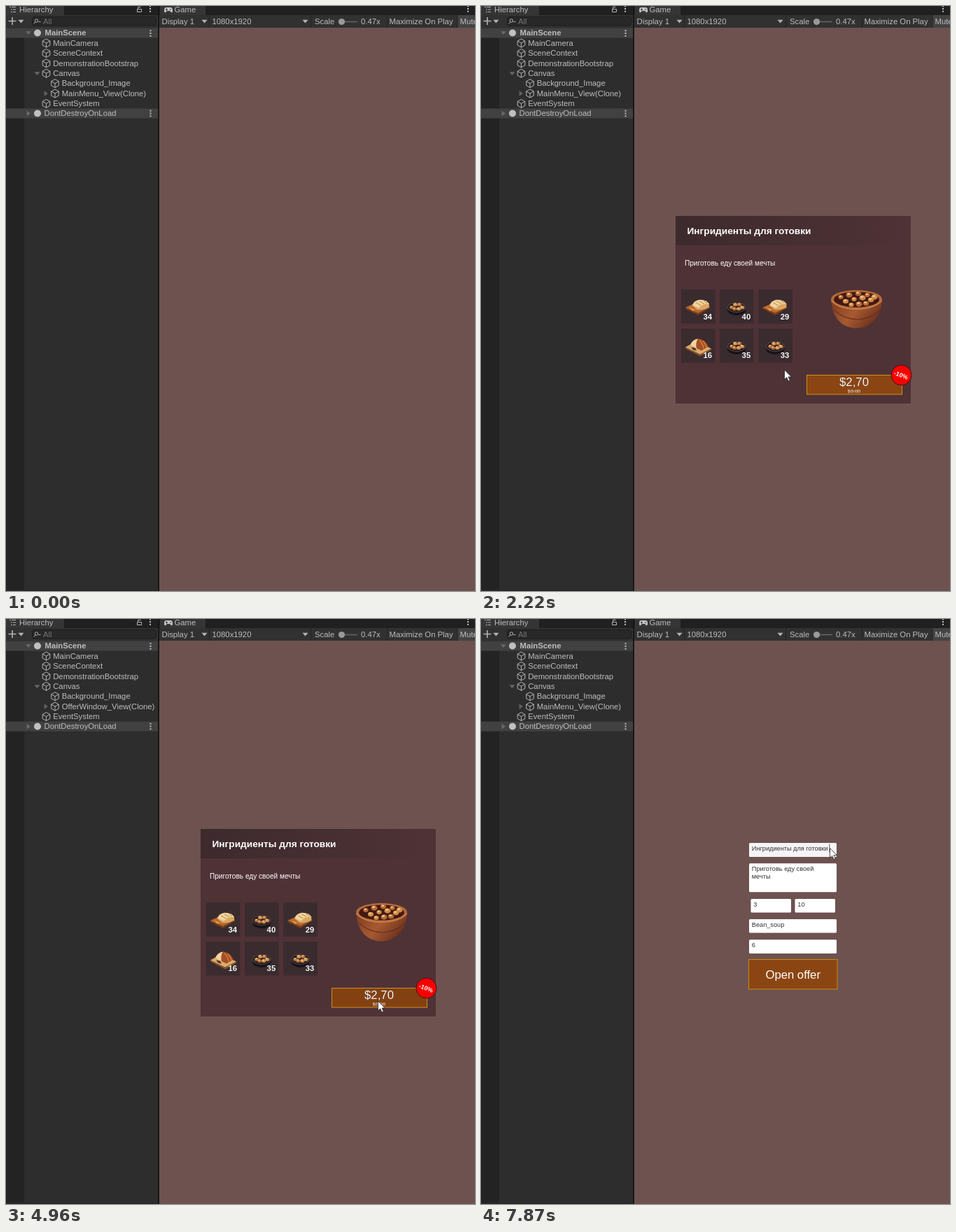
Recreate the animation shown at these times as an HTML page. Size 670 px wide and 836 px high, loop 8000 ms.

```html
<!DOCTYPE html>
<html lang="ru">
<head>
<meta charset="utf-8">
<title>Offer window demo</title>
<style>
html, body { margin: 0; width: 100%; height: 100%; overflow: hidden; background: #6d524f; }
svg { display: block; width: 670px; height: 836px; font-family: "Liberation Sans", Arial, sans-serif; }
.ui { font-size: 11.3px; fill: #bdbdbd; }
.field { font-size: 9.2px; fill: #323232; }
.count { font-size: 11.3px; font-weight: bold; fill: #fff; text-anchor: end; }
.count, .price { filter: drop-shadow(.8px .8px .5px #000); }
.price { font-size: 16.8px; fill: #fff; text-anchor: middle; }
.bold { font-weight: bold; }
.line { fill: none; stroke: #b4b4b4; }
</style>
</head>
<body>
<svg viewBox="0 0 670 836">
  <defs>
    <g id="cube" class="line" stroke-width="1">
      <path d="M0-6L5.3-3V3L0 6L-5.3 3V-3ZM-5.3-3L0 0L5.3-3M0 0V6"/>
    </g>
    <path id="down" d="M-4-2.2H4L0 2.6Z"/>
    <path id="right" d="M-2.4-4L3 0L-2.4 4Z"/>
    <g id="dots" fill="#c0c0c0"><path d="M-1-4.7h2v2h-2zM-1-1h2v2h-2zM-1 2.7h2v2h-2z"/></g>
    <linearGradient id="head">
      <stop offset="0" stop-color="#3d2a2c"/><stop offset="1" stop-color="#4f3236"/>
    </linearGradient>
    <linearGradient id="wood" x2="1" y2=".5">
      <stop offset="0" stop-color="#7b3a20"/><stop offset=".55" stop-color="#a65a31"/><stop offset="1" stop-color="#6f321d"/>
    </linearGradient>
    <g id="bread">
      <path d="M-18 0L-4-6L17-1L0 10Z" fill="#b8692f"/>
      <path d="M-18 0L0 8L17-1V1L0 11L-18 2Z" fill="#7a3d1c"/>
      <path d="M-8-3Q-6-10 2-11Q12-11 16-5L16 0Q6 5-2 3Z" fill="#d9a763"/>
      <path d="M-8-3Q-5-10 3-11Q12-11 16-5Q6-6 1 1Z" fill="#f0d49d"/>
      <path d="M-3-7L4-3M2-9L9-5M8-10L13-6" fill="none" stroke="#b98143" stroke-width="1"/>
      <path d="M-13 0l6 2 3 2-4 1z" fill="#e29a45"/>
    </g>
    <g id="meat">
      <path d="M-18 1L-3-7L19 3L3 13Z" fill="#d9ac6b"/>
      <path d="M-18 1L3 11L19 3V5L3 14L-18 3Z" fill="#87512a"/>
      <path d="M-11-2Q-7-11 1-11Q10-10 15 0L5 6Z" fill="#a44e26"/>
      <path d="M-11-2Q-8-10 0-11Q-4-5-2 3Z" fill="#f0d3a0"/>
      <path d="M2-9Q7-4 8 3M7-8Q11-4 12 1" fill="none" stroke="#d9803f" stroke-width="1.4"/>
      <path d="M-10 1l6 1 2 4-5-1z" fill="#5b3825"/>
    </g>
    <g id="bowl">
      <ellipse cy="3" rx="13.5" ry="8.5" fill="#17151a"/>
      <ellipse cy="0" rx="13.5" ry="7.5" fill="#4b4144"/>
      <ellipse cy="0" rx="12" ry="6.3" fill="#27191a"/>
      <g id="balls"></g>
    </g>
    <path id="arrow" d="M.5.5V14.2L3.7 11.3L6 16.5L8.3 15.5L6.1 10.5H10.4Z" fill="#fff" stroke="#222" stroke-width=".8"/>
  </defs>

  <rect x="219" width="451" height="836" fill="#6d524f"/>

  <g id="menu"></g>

  <g id="offer">
    <rect x="278" y="300" width="336" height="268" fill="#4f3236"/>
    <rect x="278" y="300" width="336" height="42" fill="url(#head)"/>
    <text x="294.5" y="325.5" font-size="13.7" class="bold" fill="#fff">Ингридиенты для готовки</text>
    <text x="291" y="370.5" font-size="10.1" fill="#fff">Приготовь еду своей мечты</text>
    <g id="slots"></g>
    <path d="M500 418Q502 450 523 458Q536 463 549 458Q571 449 573 419Z" fill="url(#wood)"/>
    <path d="M504 434Q517 447 537 448Q558 447 570 434" fill="none" stroke="#6a2f1b" stroke-width="1.2"/>
    <ellipse cx="536.5" cy="419" rx="36.5" ry="13" fill="#b56a3b"/>
    <ellipse cx="536.5" cy="419.5" rx="32.5" ry="11" fill="#431a14"/>
    <g id="beans"></g>
    <path d="M500.5 421Q512 433 536 433Q561 433 572.5 421" fill="none" stroke="#c77b46" stroke-width="2"/>
    <rect id="buy" x="465.5" y="527.5" width="136" height="27.5" stroke="#cf8f1c"/>
    <text x="533" y="543" class="price">$2,70</text>
    <text x="533" y="552.5" font-size="7.3" text-anchor="middle" fill="#d5c2b6" text-decoration="line-through">$3.00</text>
    <circle cx="600.5" cy="527.5" r="14.5" fill="#f80000" stroke="#3a1518"/>
    <text transform="translate(600 527.5) rotate(20)" y="3" font-size="8.8" class="bold" text-anchor="middle" fill="#fff">-10%</text>
  </g>

  <g id="editor">
    <rect width="218" height="836" fill="#2d2d2d"/>
    <rect width="26" height="836" fill="#232323"/>
    <rect width="670" height="13" fill="#202020"/>
    <rect y="13" width="670" height="18" fill="#313131"/>
    <rect width="83" height="13" fill="#353535"/>
    <rect x="220" width="65" height="13" fill="#353535"/>
    <rect y="31.5" width="217" height="14" fill="#414141"/>
    <rect y="146.5" width="217" height="14" fill="#414141"/>
    <rect y="834" width="218" height="2" fill="#272727"/>
    <rect x="217" width="2" height="836" fill="#181818"/>
    <path d="M5 1.5h2M8 1.5h6M7 5h2M10 5h4M7 8.500h2M10 8.500h4" class="line"/>
    <path d="M187.500 4.500h6v4h-6zM188.500 4V1.500h4" class="line"/>
    <path d="M3.500 21.500h11M9 16v11" class="line" stroke-width="1.600"/>
    <rect x="37.500" y="15.500" width="177" height="12.500" rx="3" fill="#282828" stroke="#1c1c1c"/>
    <circle cx="43.500" cy="21" r="2.200" class="line"/>
    <path d="M42 23l-2.500 2.500M46.500 22.500h3" class="line"/>
    <path d="M229 2h6q3 0 3 4 0 4-2 3l-2-2h-4l-2 2q-2 1-2-3 0-4 3-4z" fill="#c4c4c4"/>
    <path d="M228 5h3M229.500 3.500v3M235 4v2" stroke="#333"/>
    <rect x="645" y="13" width="25" height="18" fill="#444"/>
    <path d="M290.500 13v18M435.500 13v18M544.500 13v18M645 13v18" stroke="#222"/>
    <path d="M475 22.500h27" stroke="#666" stroke-width="1.500"/>
    <circle cx="479.500" cy="22.500" r="4.600" fill="#999"/>
    <g id="labels"></g>
  </g>

  <use id="cursor" href="#arrow"/>
</svg>
<script>
const LOOP = 8000;
const $ = id => document.getElementById(id);
const text = (x, y, str, cls, id = '') => `<text x="${x}" y="${y}" class="${cls}" id="${id}">${str}</text>`;
const use = (name, x, y, fill = '') => `<use href="#${name}" x="${x}" y="${y}" fill="${fill}"/>`;

// Editor chrome: tabs, toolbar and the object tree
const tree = [
  [57.5, 'MainCamera'], [57.5, 'SceneContext'], [57.5, 'DemonstrationBootstrap'], [57.5, 'Canvas'],
  [70, 'Background_Image'], [70, '', 'clone'], [57.5, 'EventSystem']
];
$('labels').innerHTML =
  text(19, 9.3, 'Hierarchy', 'ui') + text(240.5, 9.3, 'Game', 'ui') +
  `<g opacity=".5">${text(53, 25.5, 'All', 'ui')}</g>` +
  [[222.5, 'Display 1'], [294.5, '1080x1920'], [441, 'Scale'], [507, '0.47x'], [547.5, 'Maximize On Play'], [648.5, 'Mute']]
    .map(([x, s]) => text(x, 26, s, 'ui')).join('') +
  [[21.5, 22], [283.5, 22], [427.5, 22]].map(p => use('down', ...p, '#b4b4b4')).join('') +
  [[206, 4], [660, 4], [206.5, 39], [206.5, 153.5]].map(p => use('dots', ...p)).join('') +
  use('down', 32, 38.5, '#686868') + use('down', 44.5, 96.5, '#686868') +
  use('right', 57, 125, '#606060') + use('right', 32, 153.5, '#686868') +
  [38.5, 153.5].map(y => `<circle cx="45" cy="${y}" r="5" fill="#c0c0c0"/>`).join('') +
  text(55.5, 42.3, 'MainScene', 'ui bold') + text(54.5, 157.3, 'DontDestroyOnLoad', 'ui') +
  tree.map(([x, s, id], i) => {
    const y = 53 + i * 14.4;
    return use('cube', x, y) + text(x + 9.7, y + 3.8, s, 'ui', id);
  }).join('');

// Settings form
const fields = [
  [383, 320, 125, 20, 'Ингридиенты для готовки'], [383, 349.3, 125, 41, 'Приготовь еду своей'],
  [385.5, 400, 57.5, 19.5, '3'], [448.5, 400, 57.5, 19.5, '10'],
  [383, 429, 125, 19.5, 'Bean_soup'], [383, 458.3, 125, 19.7, '6']
];
$('menu').innerHTML =
  fields.map(([x, y, w, h], i) => `<rect id="field${i}" x="${x}" y="${y}" width="${w}" height="${h}" rx="1.5" fill="#fff"/>`).join('') +
  '<rect id="select" x="387" y="321.5" width="111" height="12" fill="#a8ceff"/>' +
  fields.map(([x, y, , , s]) => text(x + 3.8, y + 11, s, 'field')).join('') +
  text(386.8, 370.7, 'мечты', 'field') +
  '<rect id="caret" x="497.5" y="321.5" width=".8" height="12" fill="#323232"/>' +
  '<rect id="open" x="382.5" y="486.5" width="126.500" height="42.500" stroke="#c98a14"/>' +
  '<text x="445.7" y="514.2" font-size="16.7" text-anchor="middle" fill="#fff">Open offer</text>';

// Food
const blob = (x, y, r, fill) =>
  `<ellipse cx="${x}" cy="${y}" rx="${r}" ry="${r * .8}" fill="${fill}"/>` +
  `<ellipse cx="${x - r * .2}" cy="${y - r * .3}" rx="${r * .5}" ry="${r * .3}" fill="#f0c98c"/>`;
$('balls').innerHTML = [[-7, 0], [-2, -4], [4, -4], [8, 0], [-3, 2], [3, 2]]
  .map(([x, y], i) => blob(x, y, 3.2, i % 2 ? '#c98b4c' : '#a9683a')).join('');
$('beans').innerHTML = [[514, 416], [521, 422], [526, 413], [533, 419], [539, 411], [545, 417], [552, 413], [557, 420], [540, 426], [529, 427], [550, 425], [562, 416]]
  .map(([x, y], i) => blob(x, y, 3.6 + i % 3 * .5, i % 2 ? '#d08a45' : '#b96a33')).join('');
$('slots').innerHTML = [['bread', 34], ['bowl', 40], ['bread', 29], ['meat', 16], ['bowl', 35], ['bowl', 33]]
  .map(([food, n], i) => {
    const x = 286 + i % 3 * 55.2, y = 405.3 + (i > 2) * 55.7;
    return `<rect x="${x}" y="${y}" width="48.5" height="48.500" fill="#3a2b2f"/>` +
      use(food, x + 24, y + 25.5) + text(x + 44, y + 42.3, n, 'count');
  }).join('');

// Pointer moves: start, end, number of steps, route
const moves = [
  [790, 1410, 13, 'M0 305C150 400 330 530 415 530Q430 530 433 519.500'],
  [2520, 2870, 2, 'M434 519L435 518'],
  [3080, 3750, 14, 'M435 518C355 490 345 400 390 340C420 300 520 330 540 400Q545 440 538 461'],
  [4490, 4960, 10, 'M538 461Q540 510 531 545.500'],
  [6280, 6780, 11, 'M531 545Q520 400 487 327'],
  [6950, 7200, 6, 'M487 327Q487 314 498 328'],
  [7820, 7870, 2, 'M498 328L498 327']
].map(([start, end, steps, d]) => {
  const path = document.createElementNS('http://www.w3.org/2000/svg', 'path');
  path.setAttribute('d', d);
  return { start, end, steps, path, length: path.getTotalLength() };
});

function pointer(t) {
  const move = moves.filter(m => m.start <= t).pop();
  if (!move) return { x: -30, y: 305 };
  const n = move.steps - 1;
  const p = Math.min(1, Math.floor((t - move.start) / (move.end - move.start) * n + .001) / n);
  return move.path.getPointAtLength(p * p * (3 - 2 * p) * move.length);
}

// Button brightness: [time, level], linear between entries
const openLevels = [[1250, 1], [1350, .96], [1870, .96], [2020, .85], [5769, .85], [5770, 1]];
const buyLevels = [[4860, 1], [4960, .94], [5620, .94], [5720, .8]];
function level(list, t) {
  let [t0, v0] = list[0];
  for (const [t1, v1] of list) {
    if (t < t1) return t <= t0 ? v0 : v0 + (v1 - v0) * (t - t0) / (t1 - t0);
    [t0, v0] = [t1, v1];
  }
  return v0;
}
const brown = k => `rgb(${[139, 69, 19].map(c => Math.round(c * k))})`;
const between = (t, a, b) => t >= a && t < b;
const show = (id, on) => $(id).setAttribute('visibility', on ? 'visible' : 'hidden');

function draw(t) {
  const offer = between(t, 2220, 5770);
  show('offer', offer);
  $('menu').style.display = t >= 100 && !offer ? '' : 'none';
  $('clone').textContent = (between(t, 2320, 5870) ? 'OfferWindow' : 'MainMenu') + '_View(Clone)';
  $('open').setAttribute('fill', brown(level(openLevels, t)));
  $('buy').setAttribute('fill', brown(level(buyLevels, t)));
  $('field0').setAttribute('fill', t >= 6950 ? '#f4f5f4' : '#fff');
  show('select', between(t, 7200, 7550));
  show('caret', t >= 7600);
  const { x, y } = pointer(t);
  $('cursor').setAttribute('transform', `translate(${x} ${y})`);
}

function tick() {
  draw(performance.now() % LOOP);
  requestAnimationFrame(tick);
}
tick();
</script>
</body>
</html>
```
